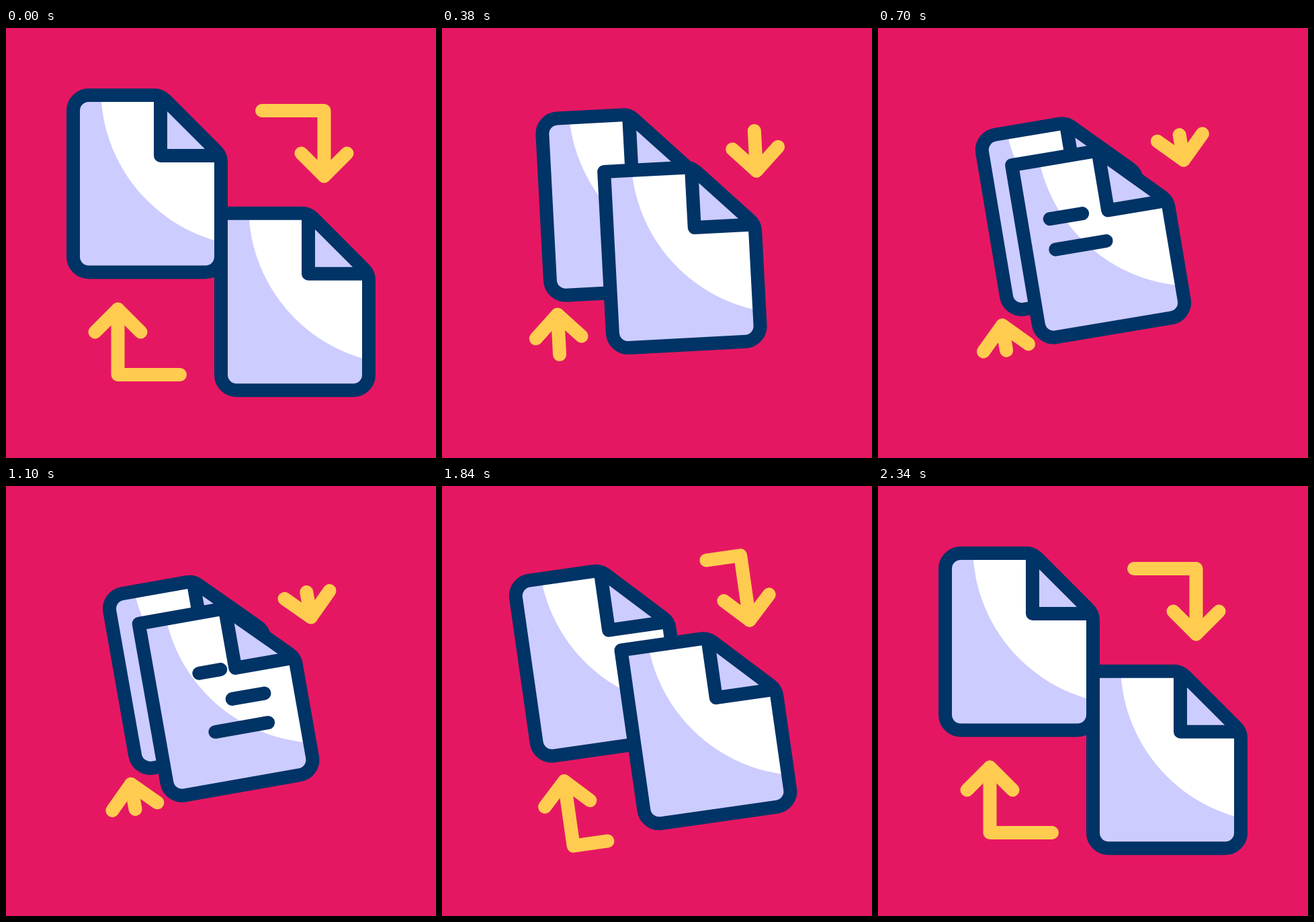
These frames come from a looping animation (640 px wide and 640 px high, 2700 ms). An HTML page with a canvas:

```html
<!DOCTYPE html>
<html lang="en">
<head>
<meta charset="utf-8">
<title>File exchange</title>
<style>
  html, body { margin: 0; height: 100%; overflow: hidden; background: #e61762; }
  canvas { display: block; width: 100vw; height: 100vh; }
</style>
</head>
<body>
<canvas width="640" height="640"></canvas>
<script>
const LOOP = 2700, MOVE = 640;
const PINK = '#e61762', NAVY = '#003366', LILAC = '#ccccff', YELLOW = '#ffcc50';
const ctx = document.querySelector('canvas').getContext('2d');

// Both sheets share one outline; only the top-left corner differs.
const sheet = corner => new Path2D(
  `M123 100H220.5A23 23 0 0 1 236.7 106.7L313.3 183.3A23 23 0 0 1 320 199.5
   V340.5A23 23 0 0 1 297 363.5H123A23 23 0 0 1 100 340.5${corner}Z`);
const backSheet = sheet('V123A23 23 0 0 1 123 100');
const frontSheet = sheet('V100');
const flap = new Path2D('M230 100V190H320Z');
const crease = new Path2D('M230 103V190H317');
const shaft = new Path2D('M473.5 220.5V123H381');
const head = new Path2D('M439.5 186.5L473.5 220.5L507.5 186.5');
const SHAFT_MAX = 190, SHAFT_MIN = 38;

// Text lines: left, right, y, start of drawing, start of erasing
const lines = [
  [142.5, 208, 188.3, 458, 920],
  [143.5, 266, 234.5, 491, 896],
  [143.5, 264, 278.5, 700, 961]
];
const LINE_TIME = 360;

const progress = (t, start, length) => Math.min(1, Math.max(0, (t - start) / length));
const smooth = u => u * u * (3 - 2 * u);

// Quick start and long settle: cubic-bezier(.22, 0, .1, 1)
function settle(x) {
  let lo = 0, hi = 1;
  for (let i = 0; i < 24; i++) {
    const u = (lo + hi) / 2, v = 1 - u;
    if (3 * u * v * v * .22 + 3 * u * u * v * .1 + u ** 3 < x) lo = u; else hi = u;
  }
  return smooth((lo + hi) / 2);
}

// Rises from 0 to 1 and later falls back
const swing = (t, ease, inAt, inTime, outAt, outTime) =>
  ease(progress(t, inAt, inTime)) - ease(progress(t, outAt, outTime));

function fill(path, color) {
  ctx.fillStyle = color;
  ctx.fill(path);
}

function stroke(path, color, cap = 'round') {
  ctx.strokeStyle = color;
  ctx.lineCap = cap;
  ctx.stroke(path);
}

function drawSheet(path, x, y, t) {
  ctx.save();
  ctx.translate(x, y);
  fill(path, LILAC);
  ctx.save();
  ctx.clip(path);
  ctx.beginPath();
  ctx.arc(376.6, 90, 235.6, 0, 2 * Math.PI);
  ctx.fillStyle = '#fff';
  ctx.fill();
  ctx.restore();
  fill(flap, LILAC);
  stroke(path, NAVY);
  stroke(crease, NAVY, 'butt');
  if (path === frontSheet) drawLines(t);
  ctx.restore();
}

function drawLines(t) {
  for (const [left, right, y, drawAt, eraseAt] of lines) {
    const at = start => left + (right - left) * smooth(progress(t, start, LINE_TIME));
    const from = at(eraseAt), to = at(drawAt);
    if (to - from > .1) stroke(new Path2D(`M${from} ${y}H${to}`), NAVY);
  }
}

function drawArrow(length) {
  ctx.setLineDash([length, 999]);
  stroke(shaft, YELLOW);
  ctx.setLineDash([]);
  stroke(head, YELLOW);
}

function draw(now) {
  const t = now % LOOP;
  const turn = swing(t, smooth, 147, MOVE, 1663, MOVE);
  const near = swing(t, settle, 150, 610, 1660, MOVE);
  const trim = swing(t, settle, 147, 456, 1594, 650);
  const length = SHAFT_MAX - (SHAFT_MAX - SHAFT_MIN) * trim;

  ctx.fillStyle = PINK;
  ctx.fillRect(0, 0, 640, 640);
  ctx.save();
  ctx.lineWidth = 20;
  ctx.lineJoin = 'round';
  ctx.translate(320, 320);
  ctx.rotate(-turn * Math.PI / 18);
  ctx.translate(-320, -320);

  drawArrow(length);
  ctx.save();
  ctx.translate(640, 639);
  ctx.scale(-1, -1);
  drawArrow(length);
  ctx.restore();

  drawSheet(backSheet, 80 * near, 37 * near, t);
  drawSheet(frontSheet, 220 - 100.5 * near, 175.7 - 90.3 * near, t);
  ctx.restore();
}

const begin = performance.now();
function tick() {
  draw(performance.now() - begin);
  requestAnimationFrame(tick);
}
tick();
</script>
</body>
</html>
```
